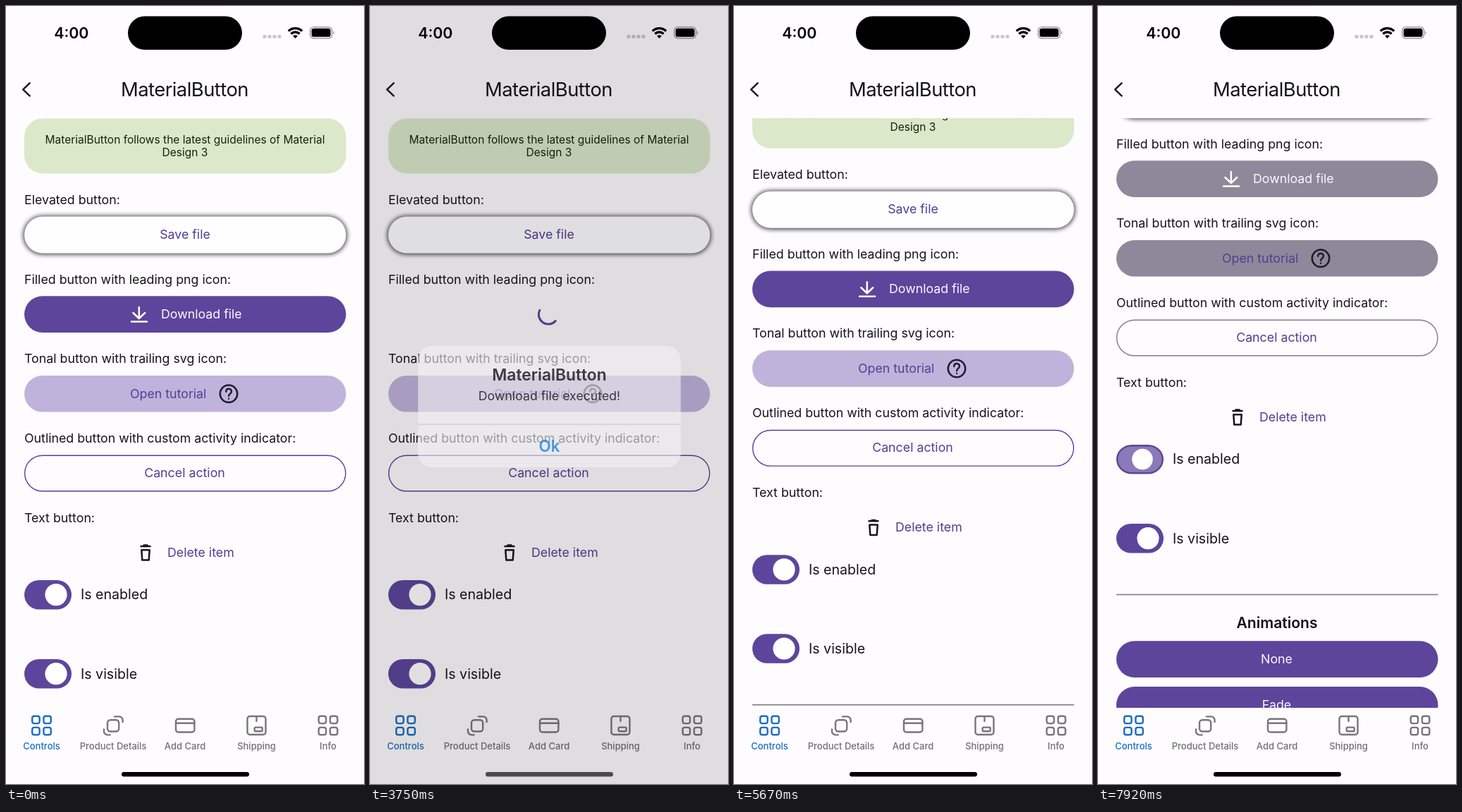
Animation of 508 by 1103 pixels, one loop 8000 ms. Source, as an HTML page:

```html
<!DOCTYPE html>
<html lang="en">
<head>
<meta charset="utf-8">
<title>MaterialButton</title>
<style>
  html, body { margin: 0; width: 100%; height: 100%; overflow: hidden; background: #fefcff; }
  svg { display: block; width: 100%; height: 100%; }
  text {
    font-family: Inter, "Liberation Sans", sans-serif;
    font-size: 17.77px;
    font-optical-sizing: none;
    fill: #15141a;
  }
  .mid { text-anchor: middle; }
  .link { fill: #4f3f93; }
  .light { fill: #fbf8ff; }
  .row { font-size: 19.6px; }
  .note { font-size: 15.52px; fill: #16240c; text-anchor: middle; }
  .line { fill: none; stroke-linecap: round; stroke-linejoin: round; }
  .tab text { font-size: 13px; font-weight: 500; fill: #6f6e74; text-anchor: middle; }
  .tab .line { stroke: #77767b; stroke-width: 2.4; }
  .tab.on text { fill: #1b6ec2; }
  .tab.on .line { stroke: #1b6ec2; }
</style>
</head>
<body>
<svg viewBox="0 0 508 1103" preserveAspectRatio="none">
  <defs>
    <clipPath id="view"><rect x="0" y="159" width="508" height="836"/></clipPath>
    <filter id="blur" x="-5%" y="-40%" width="110%" height="180%" color-interpolation-filters="sRGB">
      <feGaussianBlur stdDeviation="3.1"/>
    </filter>
  </defs>
  <rect width="508" height="1103" fill="#fefcff"/>

  <g clip-path="url(#view)"><g id="page">
    <rect x="26" y="159.5" width="456.5" height="78" rx="26" fill="#dbe8ca"/>
    <text class="note" x="254" y="195">MaterialButton follows the latest guidelines of Material</text>
    <text class="note" x="254" y="213">Design 3</text>

    <text x="26" y="281">Elevated button:</text>
    <rect x="24.3" y="297.2" width="459.9" height="55.4" rx="27.7" opacity=".7" filter="url(#blur)"/>
    <rect x="26" y="298.5" width="456.5" height="52" rx="26" fill="#fefdff"/>
    <text class="mid link" x="254" y="330">Save file</text>

    <text x="26" y="393.5">Filled button with leading png icon:</text>
    <g id="filled">
      <rect id="filledBg" x="26" y="411.3" width="456.5" height="51.7" rx="25.8"/>
      <path class="line" stroke="#fff" stroke-width="2.5" d="M188.8 427V442.4M180.4 435l8.4 8 8.4-8M178 447.4h22"/>
      <text class="light" x="220" y="443">Download file</text>
    </g>
    <path id="spinner" class="line" stroke="#5d459b" stroke-width="3"/>

    <text x="26" y="506">Tonal button with trailing svg icon:</text>
    <rect id="tonalBg" x="26" y="524" width="456.5" height="51.6" rx="25.8"/>
    <text class="link" x="176" y="555.5">Open tutorial</text>
    <g class="line" stroke="#1f1b2e" stroke-width="2.6">
      <circle cx="316" cy="549.7" r="12.2"/>
      <path d="M312.2 546.8c0-5.4 7.8-5.2 7.8-.3 0 3-3.9 3.3-3.9 6.4M316.1 556.6v.2" stroke-width="2.4"/>
    </g>

    <text x="26" y="618.8">Outlined button with custom activity indicator:</text>
    <rect id="outline" x="26.6" y="637.2" width="455.3" height="50.6" rx="25.3" fill="none" stroke-width="1.4"/>
    <text class="mid link" x="253.5" y="668">Cancel action</text>

    <text x="26" y="731.5">Text button:</text>
    <path class="line" stroke="#15141a" stroke-width="2.5" d="M191.5 766h13M195.5 764.6h5M192.3 771.3h11.4l-1 14.3h-9.4z"/>
    <text class="link" x="229" y="780.6">Delete item</text>

    <g id="enabled">
      <rect id="track" x="26" y="814" width="67" height="41.5" rx="20.75"/>
      <circle id="thumb" cy="834.6" fill="#fff"/>
    </g>
    <text class="row" x="106" y="841.3">Is enabled</text>
    <rect x="26" y="926" width="67" height="41.5" rx="20.75" fill="#5d459b"/>
    <circle cx="71" cy="946.7" r="15.6" fill="#fff"/>
    <text class="row" x="106" y="953.6">Is visible</text>

    <path d="M26 1026.5H482.5" stroke="#78767b" stroke-width="1.5"/>
    <text class="mid" x="254" y="1074" style="font-size:21.1px;font-weight:600">Animations</text>
    <g fill="#5d459b">
      <rect x="26" y="1092.3" width="456.5" height="51.7" rx="25.8"/>
      <rect x="26" y="1157" width="456.5" height="51.7" rx="25.8"/>
    </g>
    <text class="mid light" x="253.5" y="1124">None</text>
    <text class="mid light" x="253.5" y="1188.8">Fade</text>
  </g></g>

  <text x="68.2" y="45.8" style="font-size:21.4px;font-weight:600;fill:#000">4:00</text>
  <rect x="173" y="14.5" width="162" height="47.5" rx="23.75"/>
  <g id="dots" fill="#c6c5c9"></g>
  <g fill="none" stroke="#000">
    <path stroke-width="3.3" d="M400.8 35.6a13.8 13.8 0 0 1 19.4 0M404.4 39.5a8.7 8.7 0 0 1 12.2 0"/>
    <rect x="431.6" y="29.8" width="31" height="16" rx="5.2" stroke="#8d8c90" stroke-width="1.3"/>
  </g>
  <path d="M410.5 46l-3.3-3.4a4.7 4.7 0 0 1 6.6 0z"/>
  <rect x="433.6" y="31.8" width="27" height="12" rx="3.4"/>
  <path d="M464.4 35.2q2.6 2.6 0 5.2z" fill="#8d8c90"/>

  <path class="line" stroke="#1c1c26" stroke-width="2.6" d="M33.6 109.4l-9.4 9 9.4 9"/>
  <text class="mid" x="253.5" y="128" style="font-size:27.4px;letter-spacing:-.54px">MaterialButton</text>

  <g id="tabs"></g>
  <rect id="home" x="164" y="1086" width="181" height="6.4" rx="3.2"/>

  <rect id="dim" width="508" height="1103"/>
  <g id="alert">
    <rect id="panel" x="80" y="487.5" width="349" height="161" rx="18" fill="#f3f2f5"/>
    <g id="words" class="mid">
      <path d="M80 591.5H429" stroke="#c3c1c7" stroke-width="1"/>
      <text x="254.5" y="533.4" style="font-size:21.4px;font-weight:600">MaterialButton</text>
      <text x="254.5" y="560" style="font-size:16.6px">Download file executed!</text>
      <rect id="press" x="80" y="592" width="349" height="56.5" rx="16" fill="#000" opacity="0"/>
      <text x="254.5" y="627.8" style="font-size:20.9px;font-weight:600;fill:#1f86dc">Ok</text>
    </g>
  </g>
</svg>
<script>
const LOOP = 8000, STEP = 1000 / 12;
const PURPLE = '#5d459b';
const $ = id => document.getElementById(id);
const set = (id, attrs) => {
  for (const k in attrs) $(id).setAttribute(k, attrs[k]);
};

// Bottom tabs, each icon drawn around its own centre
const box = (x, y, w, h, r) => `<rect class="line" x="${x}" y="${y}" width="${w}" height="${h}" rx="${r}"/>`;
const path = d => `<path class="line" d="${d}"/>`;
const grid = [-13.3, 2.9].map(x => [-13.3, 2.9].map(y => box(x, y, 10.4, 10.4, 2.8)).join('')).join('');
const tabs = [
  ['Controls', 50.5, grid],
  ['Product Details', 152, box(-8, -7.7, 16.2, 16.2, 4) +
    path('M2 -12.6h6.6a5 5 0 0 1 5 5V-5M-13 5.4v3a5 5 0 0 0 5 5h3.6')],
  ['Add Card', 254, box(-13, -9.3, 26.4, 18.8, 3.6) + path('M-13 -3.2h26.4')],
  ['Shipping', 355.5, box(-13, -13, 26, 26, 3.4) + path('M0 -13v7') + box(-2.8, 2.6, 11, 5.6, 1.4)],
  ['Info', 457, grid]
];
$('tabs').innerHTML = tabs.map(([label, x, icon], i) =>
  `<g class="tab${i ? '' : ' on'}" transform="translate(${x} 1020)">${icon}<text y="33.8">${label}</text></g>`).join('');
$('dots').innerHTML = [367, 374, 381, 388].map(x =>
  `<rect x="${x - 2.6}" y="41" width="5.2" height="4.8" rx="1.8"/>`).join('');

// Motion tables: [ms, value]
const scroll = [[5417, 0], [5583, 22], [6083, 104], [6333, 132], [6500, 136], [6583, 141], [6833, 192]];
const alertIn = [[3583, 0], [3667, .2], [3750, .6], [3833, .85], [3917, .97], [4000, 1]];
const alertOut = [[4417, 1], [4500, .8], [4667, .25], [4750, 0]];

function at(table, t) {
  if (t <= table[0][0]) return table[0][1];
  for (let i = 1; i < table.length; i++) {
    const [t0, a] = table[i - 1], [t1, b] = table[i];
    if (t <= t1) return a + (b - a) * (t - t0) / (t1 - t0);
  }
  return table[table.length - 1][1];
}

function arc(from, sweep) {
  const point = deg => {
    const a = deg * Math.PI / 180;
    return `${(253 + 13.6 * Math.cos(a)).toFixed(2)} ${(437.4 + 13.6 * Math.sin(a)).toFixed(2)}`;
  };
  return `M${point(from)}A13.6 13.6 0 ${sweep > 180 ? 1 : 0} 1 ${point(from + sweep)}`;
}

function render(ms) {
  const t = Math.floor((ms + 5) / STEP) * STEP;

  set('page', { transform: `translate(0 ${-at(scroll, t).toFixed(2)})` });

  const pressed = t > 1490 && t < 1660;
  const busy = t > 1660 && t < 4825;
  const disabled = t > 7900;
  set('filled', { visibility: busy ? 'hidden' : 'visible' });
  set('filledBg', { fill: disabled ? '#8f879a' : pressed ? '#806db3' : PURPLE });
  set('tonalBg', { fill: disabled ? '#8f879a' : '#bfb3dc' });
  set('outline', { stroke: disabled ? '#7f7c82' : '#55439a' });
  set('spinner', { visibility: busy ? 'visible' : 'hidden' });
  if (busy) {
    const s = (t - 3750) / 1000;
    const sweep = 165 + 70 * Math.sin(s * 4.7);
    set('spinner', { d: arc(124 + 300 * s - sweep / 2, sweep) });
  }

  set('track', disabled
    ? { fill: '#8b79b8', stroke: '#5b4694', 'stroke-width': 2.4, x: 27.2, y: 815.2, width: 64.6, height: 39.1 }
    : { fill: PURPLE, stroke: 'none', x: 26, y: 814, width: 67, height: 41.5 });
  set('thumb', { cx: disabled ? 63 : 71, r: disabled ? 14.8 : 15.6 });

  const show = at(alertIn, t), p = Math.min(show, at(alertOut, t));
  const zoom = 1.17 - .17 * show, gray = Math.round(142 * p);
  set('dim', { opacity: .2 * p });
  set('home', { fill: `rgb(${gray},${gray},${gray})` });
  set('alert', {
    visibility: p > 0 ? 'visible' : 'hidden',
    transform: `translate(254.5 568) scale(${zoom}) translate(-254.5 -568)`
  });
  set('panel', { opacity: p });
  set('words', { opacity: Math.min(1, p * 1.35) });
  set('press', { opacity: t > 4325 && t < 4495 ? .08 : 0 });
}

const start = performance.now();
function tick() {
  render((performance.now() - start) % LOOP);
  requestAnimationFrame(tick);
}
render(0);
requestAnimationFrame(tick);
</script>
</body>
</html>
```
